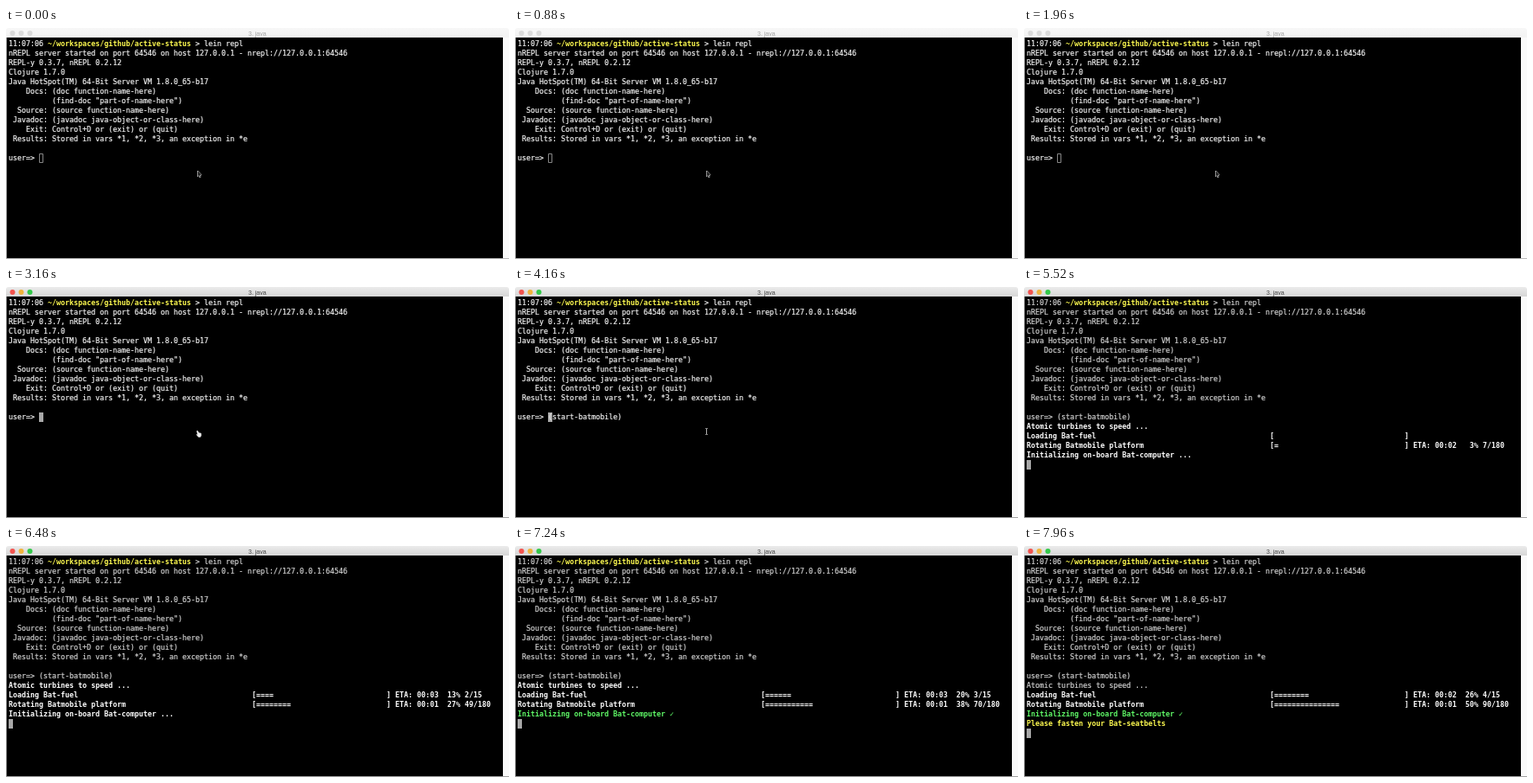
Recreate the animation shown at these times as an HTML page with a canvas. Size 579 by 267 pixels, loop 8000 ms.

```html
<!DOCTYPE html>
<html lang="en">
<head>
<meta charset="utf-8">
<title>Terminal session</title>
<style>
html, body { margin: 0; width: 100%; height: 100%; overflow: hidden; background: #fff; }
canvas { display: block; width: 579px; height: 267px; }
</style>
</head>
<body>
<canvas id="stage" width="579" height="267"></canvas>
<script>
const W = 579, H = 267, LOOP = 8000;
const CELL = 5, LINE = 11, LEFT = 3, BASE = 21;
const MONO = '8.305px "DejaVu Sans Mono", monospace';
const PLAIN = '#f4f4f4', GREY = '#d2d2d2', WHITE = '#fff', YELLOW = '#fffb50', GREEN = '#5ff967';
const ctx = document.getElementById('stage').getContext('2d');

// Moments of the session, in ms
const T = {
  focus: 2000, hand: 2600, type: 3200, beam: 3400, match: 4640,
  enter: 4720, status: 4960, done: 7200, dim: 7600, belts: 7600
};
const KEY_MS = 55;
const PROMPT = 'user=> ';
const COMMAND = '(start-batmobile)';
const PLATFORM = [[5360, 0], [5520, 7.2], [6480, 49.3], [7960, 90.2], [8000, 91]];

const BANNER = [
  'nREPL server started on port 64546 on host 127.0.0.1 - nrepl://127.0.0.1:64546',
  'REPL-y 0.3.7, nREPL 0.2.12',
  'Clojure 1.7.0',
  'Java HotSpot(TM) 64-Bit Server VM 1.8.0_65-b17',
  '    Docs: (doc function-name-here)',
  '          (find-doc "part-of-name-here")',
  '  Source: (source function-name-here)',
  ' Javadoc: (javadoc java-object-or-class-here)',
  '    Exit: Control+D or (exit) or (quit)',
  ' Results: Stored in vars *1, *2, *3, an exception in *e'
];

function rect(x, y, w, h, color) {
  ctx.fillStyle = color;
  ctx.fillRect(x, y, w, h);
}

// Plain text gets a hairline outline for a slightly heavier weight
function put(row, col, text, color, bold = false) {
  ctx.font = (bold ? 'bold ' : '') + MONO;
  ctx.textAlign = 'left';
  ctx.fillStyle = ctx.strokeStyle = color;
  ctx.lineWidth = .2;
  [...text].forEach((ch, i) => {
    if (ch === ' ') return;
    const x = LEFT + (col + i) * CELL, y = BASE + row * LINE;
    ctx.fillText(ch, x, y);
    if (!bold) ctx.strokeText(ch, x, y);
  });
}

function along(points, t) {
  if (t <= points[0][0]) return points[0][1];
  for (let i = 1; i < points.length; i++) {
    const [t0, a] = points[i - 1], [t1, b] = points[i];
    if (t <= t1) return a + (b - a) * (t - t0) / (t1 - t0);
  }
  return points[points.length - 1][1];
}

function drawWindow(active) {
  rect(0, 0, W, H, '#fff');
  rect(0, 3, 1, H - 3, active ? '#8c8c8c' : '#a8a8a8');
  rect(0, H - 1, W, 1, active ? '#a0a0a0' : '#b8b8b8');

  const bar = ctx.createLinearGradient(0, 0, 0, 11);
  bar.addColorStop(0, active ? '#ebebeb' : '#f7f7f7');
  bar.addColorStop(1, active ? '#d6d6d6' : '#f3f3f3');
  ctx.fillStyle = bar;
  ctx.beginPath();
  ctx.roundRect(0, 0, W, 11, [3, 3, 0, 0]);
  ctx.fill();

  const lights = active ? ['#f2544f', '#f0b43c', '#34c84a'] : ['#dadada', '#dadada', '#dadada'];
  lights.forEach((color, i) => {
    ctx.fillStyle = color;
    ctx.beginPath();
    ctx.arc(7.5 + i * 10, 6, 3, 0, 7);
    ctx.fill();
  });

  ctx.font = '7px "Liberation Sans", Arial, sans-serif';
  ctx.textAlign = 'center';
  ctx.fillStyle = active ? '#444' : '#a5a5a5';
  ctx.fillText('3. java', 289.3, 8.5);

  rect(1, 11, 571, H - 12, '#000');
  rect(572, 11, 7, H - 12, '#fafafa');
}

function drawBanner(color) {
  put(0, 0, '11:07:06', color);
  put(0, 9, '~/workspaces/github/active-status', YELLOW, true);
  put(0, 43, '> lein repl', color);
  BANNER.forEach((line, i) => put(i + 1, 0, line, color));
}

function drawCaret(row, col, active) {
  const x = LEFT + col * CELL, y = 13 + row * LINE;
  if (active) {
    rect(x, y, CELL, LINE, '#a8a8a8');
  } else {
    ctx.strokeStyle = '#858585';
    ctx.lineWidth = 1;
    ctx.strokeRect(x + .5, y + .5, CELL - 1, LINE - 1);
  }
}

function drawBar(row, label, n, total, stepMs) {
  put(row, 0, label, WHITE, true);
  const share = n / total;
  put(row, 56, '[' + '='.repeat(Math.floor(share * 30)).padEnd(30) + ']', WHITE, true);
  if (!n) return;
  const eta = String(Math.round((total - n) * stepMs / 1000)).padStart(2, '0');
  const percent = String(Math.floor(share * 100)).padStart(3);
  put(row, 89, `ETA: 00:${eta} ${percent}% ${n}/${total}`, WHITE, true);
}

function drawStatus(t) {
  const turned = Math.floor(along(PLATFORM, t));
  const dim = t >= T.dim;
  put(13, 0, 'Atomic turbines to speed ...', dim ? GREY : WHITE, !dim);
  drawBar(14, 'Loading Bat-fuel', Math.floor(turned / 22), 15, 220);
  drawBar(15, 'Rotating Batmobile platform', turned, 180, 11);
  const done = t >= T.done;
  put(16, 0, 'Initializing on-board Bat-computer ' + (done ? '✓' : '...'), done ? GREEN : WHITE, true);
  if (t >= T.belts) put(17, 0, 'Please fasten your Bat-seatbelts', YELLOW, true);
}

function shape(points, fill, stroke) {
  ctx.beginPath();
  points.forEach(([x, y]) => ctx.lineTo(x, y));
  ctx.closePath();
  ctx.strokeStyle = stroke;
  ctx.lineWidth = 1;
  ctx.lineJoin = 'round';
  ctx.stroke();
  ctx.fillStyle = fill;
  ctx.fill();
}

function drawPointer(t) {
  if (t < T.hand) {
    shape([[220.5, 165], [220.5, 171.5], [222, 170.3], [223, 172.8], [224, 172.3],
      [223, 170], [225, 169.8]], '#222', '#f4f4f4');
  } else if (t < T.beam) {
    shape([[219.5, 166.5], [220.5, 166], [222, 168.5], [224.5, 169], [224.8, 171.5],
      [223.8, 173.5], [221.5, 173.5], [219, 170.5], [220.5, 170.5]], '#f0f0f0', '#555');
  } else if (t < T.enter) {
    rect(220, 163, 1, 8, '#b0b0b0');
    rect(219, 163, 3, 1, '#808080');
    rect(219, 170, 3, 1, '#808080');
  }
}

function draw(t) {
  const active = t >= T.focus;
  const color = t < T.status ? PLAIN : GREY;
  drawWindow(active);
  drawBanner(color);

  const typed = Math.max(0, Math.min(COMMAND.length, Math.floor((t - T.type) / KEY_MS)));
  const matching = typed === COMMAND.length && t < T.match;
  if (t < T.enter) drawCaret(12, PROMPT.length + (matching ? 0 : typed), active);
  put(12, 0, PROMPT + COMMAND.slice(0, typed), color);

  if (t >= T.status) drawStatus(t);
  if (t >= T.enter) drawCaret(t < T.status ? 13 : t < T.belts ? 17 : 18, 0, true);
  drawPointer(t);
}

const start = performance.now();
function tick() {
  draw((performance.now() - start) % LOOP);
  requestAnimationFrame(tick);
}
tick();
</script>
</body>
</html>
```
